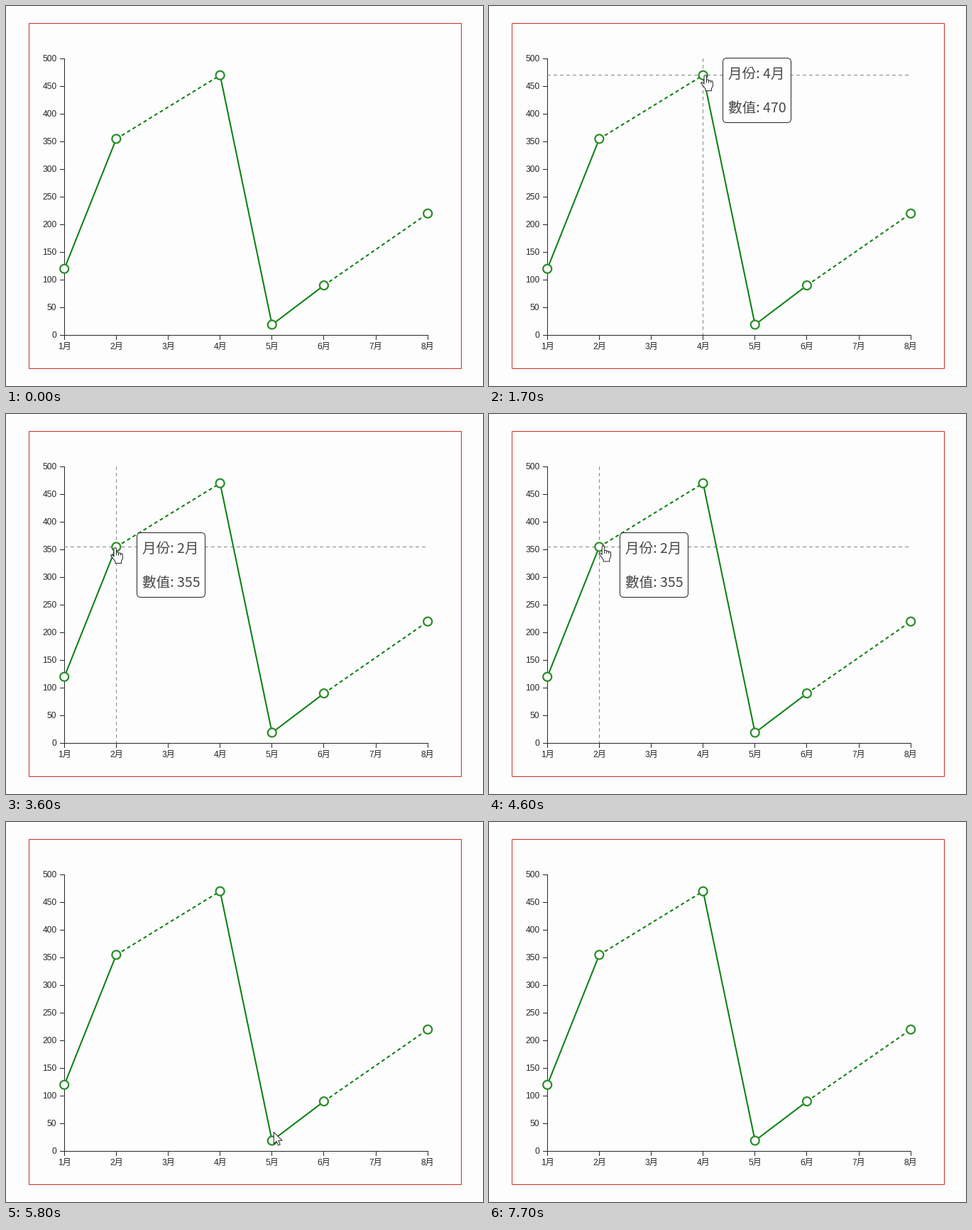
These frames come from a looping animation (672x536 px, 8 s). A matplotlib script:

```python
import numpy as np
import matplotlib.pyplot as plt
from matplotlib.animation import FuncAnimation
from matplotlib.patches import Circle, FancyBboxPatch, Polygon, Rectangle

W, H, DPI = 672, 536, 64
FRAMES, INTERVAL = 80, 100
LEFT, RIGHT, TOP, BOTTOM = 82, 594, 74, 464
PAPER, INK, SOFT_INK = "#fdfdfd", "#262626", "#484848"
LINE, RING, BORDER, GUIDE = "#08800c", "#2a8c28", "#c43329", "#86868c"
LABEL_FONT = ["Liberation Sans", "Noto Sans CJK JP"]
HOVER_RADIUS = 7

VALUES = {1: 120, 2: 355, 4: 470, 5: 19, 6: 90, 8: 220}
TOOLTIPS = {4: (330, 73), 2: (185, 167), 5: (404, 424)}

# Pointer stops, and moves between them: start, end, from, bend, to
ENTRY, APRIL, FEBRUARY = (361, 16), (304.5, 97.5), (153.5, 188.5)
MAY, EXIT = (376, 447), (-70, 400)
MOVES = [(5, 17, ENTRY, (315, 67), APRIL),
         (24, 36, APRIL, (193, 221), FEBRUARY),
         (45, 59, FEBRUARY, (403, 98), MAY),
         (72, 77, MAY, (180, 440), EXIT)]

ARROW = np.array([(0, 0), (0, 16.5), (3.8, 13), (6.4, 18.6), (9, 17.5),
                  (6.5, 12.1), (11.8, 11.8)])
FINGERS = [(2 + 3 * i + dx, 6.5 + i) for i in range(3) for dx in (0, 2.5)]
HAND = np.array([(-1.5, 12.5), (-1.5, 1), (.2, 0), (2, 1), *FINGERS, (11, 15),
                 (9, 19), (9, 22), (.5, 22), (.5, 19.5), (-6, 11), (-4.5, 9.8)])
KNUCKLES = np.array([p for x, y in FINGERS[::2]
                     for p in ((x, y), (x, 11), (np.nan, np.nan))])

plt.rcParams["path.snap"] = False


def px(size):
    return size * 72 / DPI


def point(month):
    return np.array([LEFT + (month - 1) * (RIGHT - LEFT) / 7 + .2,
                     BOTTOM - VALUES.get(month, 0) * (BOTTOM - TOP) / 500 + .3])


def pixel_centre(v):
    return np.floor(v) + .5


def stroke(xs, ys, color=INK, width=1, dashed=False, z=1):
    style = (0, (5 / width, 4 / width)) if dashed else "-"
    line, = ax.plot(xs, ys, color=color, lw=px(width), ls=style, zorder=z,
                    dash_capstyle="butt", solid_capstyle="butt")
    return line


def label(x, y, text="", size=12, family=LABEL_FONT, color=INK, z=1, **kw):
    return ax.text(x, y, text, fontsize=px(size), family=family, color=color,
                   va="baseline", zorder=z, **kw)


fig = plt.figure(figsize=(W / DPI, H / DPI), dpi=DPI, facecolor=PAPER)
ax = fig.add_axes([0, 0, 1, 1])
ax.set(xlim=(0, W), ylim=(H, 0))
ax.axis("off")

ax.add_patch(Rectangle((32.5, 24.5), 609, 487, fill=False, ec=BORDER, lw=px(1)))

# Axes
stroke([LEFT + .5] * 2, [TOP, BOTTOM + 1])
stroke([LEFT, RIGHT + 1], [BOTTOM + .5] * 2)
for i in range(11):
    y = TOP + 39 * i
    stroke([LEFT - 6, LEFT + 1], [y + .5] * 2)
    label(71.5, y + 4.4, str(500 - 50 * i), ha="right")
for month in range(1, 9):
    x = point(month)[0]
    stroke([pixel_centre(x)] * 2, [BOTTOM, BOTTOM + 7])
    label(x, 484.3, f"{month}月", ha="center")

# Data, dashed across missing months
months = list(VALUES)
for a, b in zip(months, months[1:]):
    stroke(*zip(point(a), point(b)), LINE, 2, dashed=b - a > 1, z=3)
for month in months:
    ax.add_patch(Circle(point(month), 6, fc=PAPER, ec=RING, lw=px(2.2), zorder=4))

# Hover parts
guide_v = stroke([0, 0], [TOP, BOTTOM], GUIDE, dashed=True, z=2)
guide_h = stroke([LEFT, RIGHT + 1], [0, 0], GUIDE, dashed=True, z=2)
tip_box = FancyBboxPatch((0, 0), 96, 91, boxstyle="round,pad=0,rounding_size=5.5",
                         fc=PAPER, ec=INK, lw=px(1), zorder=6)
ax.add_patch(tip_box)
tip_lines = [label(0, 0, size=19.6, family="Noto Sans CJK JP", color=SOFT_INK, z=7)
             for _ in range(2)]

arrow, hand = (Polygon(shape, closed=True, fc=PAPER, ec=INK, lw=px(1),
                       joinstyle="round", zorder=8) for shape in (ARROW, HAND))
ax.add_patch(arrow)
ax.add_patch(hand)
knuckles = stroke([], [], z=9)
hover_parts = [guide_v, guide_h, tip_box, *tip_lines, hand, knuckles]


def pointer(frame):
    """Eased position along the latest move, or None while off stage."""
    started = [move for move in MOVES if move[0] <= frame]
    if not started or frame >= MOVES[-1][1]:
        return None
    start, end, a, bend, b = started[-1]
    t = min((frame - start) / (end - start), 1)
    s = t * t * (3 - 2 * t)
    return ((1 - s) ** 2 * np.array(a) + 2 * s * (1 - s) * np.array(bend)
            + s * s * np.array(b))


def show_hover(month, tip):
    left, top = TOOLTIPS[month]
    x, y = pixel_centre(point(month))
    value = VALUES[month]
    guide_v.set_xdata([x, x])
    guide_h.set_ydata([y, y])
    tip_box.set_bounds(left - .5, top + .5, 63 + 11 * len(str(value)), 91)
    for i, text in enumerate((f"月份: {month}月", f"數值: {value}")):
        tip_lines[i].set_text(text)
        tip_lines[i].set_position((left + 7, top + 28.7 + 48 * i))
    hand.set_xy(HAND + tip)
    knuckles.set_data(*(KNUCKLES + tip).T)


def update(frame):
    tip = pointer(frame)
    active = None
    if tip is not None:
        active = next((m for m in TOOLTIPS
                       if np.hypot(*(tip - point(m))) < HOVER_RADIUS), None)
        arrow.set_xy(ARROW + tip + .5)
    if active:
        show_hover(active, tip)
    for part in hover_parts:
        part.set_visible(active is not None)
    arrow.set_visible(tip is not None and active is None)
    return [*hover_parts, arrow]


anim = FuncAnimation(fig, update, frames=FRAMES, interval=INTERVAL,
                     repeat=True, repeat_delay=0)
plt.show()
```
